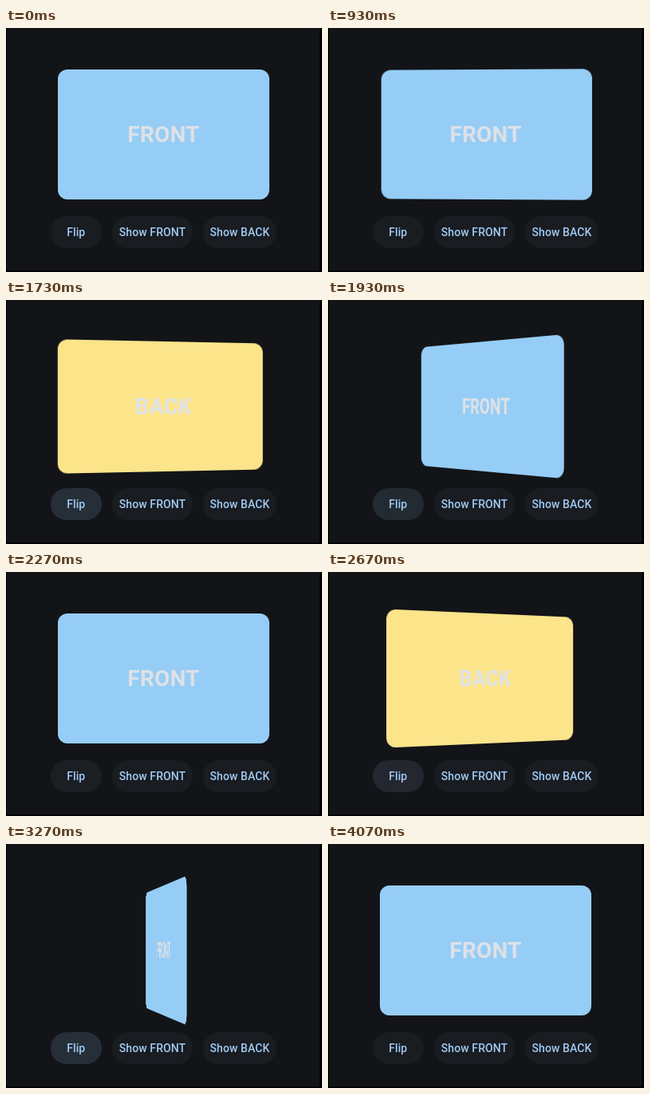
An HTML page for the animation above (4670 ms loop, 396 by 306 pixels).

```html
<!DOCTYPE html>
<html lang="en">
<head>
<meta charset="utf-8">
<title>Flip card</title>
<style>
  html, body { margin: 0; width: 100%; height: 100%; overflow: hidden; background: #000; }
  body { position: relative; font-family: Roboto, sans-serif; }
  .screen { position: absolute; left: 1px; top: 0; width: 392px; height: 304px; background: #121418; }
  .card, .button {
    position: absolute; display: flex; align-items: center; justify-content: center;
    white-space: nowrap;
  }
  .card {
    left: 65px; top: 51.5px; width: 265px; height: 163px; border-radius: 12px;
    color: #dee1e6; font-size: 28px; font-weight: 700; letter-spacing: 0.2px;
  }
  .button {
    top: 235.5px; height: 40px; border-radius: 20px; background: #191c20;
    color: #a0caf6; font-size: 14px; font-weight: 500; letter-spacing: 0.1px;
  }
  #flip { left: 55.5px; width: 64.5px; }
  #show-front { left: 133px; width: 101px; }
  #show-back { left: 247px; width: 92px; }
</style>
</head>
<body>
<div class="screen"></div>
<div class="card" id="card">FRONT</div>
<div class="button" id="flip">Flip</div>
<div class="button" id="show-front">Show FRONT</div>
<div class="button" id="show-back">Show BACK</div>
<script>
  const LOOP = 4670;
  const STEP = 200 / 3;
  const FLIP_MS = 450;
  const FLIP_STARTS = [880, 1641, 2344, 3029];

  const REST = [25, 28, 32];
  const HOVER = [36, 38, 48];
  const PRESS = [38, 47, 56];
  const TINTS = [
    [930, REST], [1050, PRESS], [1250, PRESS], [1470, REST], [1560, REST],
    [1680, PRESS], [1870, PRESS], [2130, REST], [2270, [27, 30, 35]],
    [2400, PRESS], [2500, HOVER], [2930, HOVER], [3070, PRESS],
    [3270, PRESS], [3530, REST]
  ];

  const card = document.getElementById("card");
  const flipButton = document.getElementById("flip");

  const clamp = v => Math.min(1, Math.max(0, v));
  const mix = (a, b, k) => a + (b - a) * k;

  // Cubic Bezier ease (0.42, 0, 0.58, 1), solved by bisection.
  function easeInOut(x) {
    if (x <= 0 || x >= 1) return clamp(x);
    let lo = 0, hi = 1, u = 0.5;
    for (let i = 0; i < 24; i++) {
      u = (lo + hi) / 2;
      const v = 1 - u;
      const px = 1.26 * v * v * u + 1.74 * v * u * u + u * u * u;
      if (px < x) lo = u; else hi = u;
    }
    return u * u * (3 - 2 * u);
  }

  function angleAt(t) {
    return FLIP_STARTS.reduce((angle, start, i) => {
      const turn = 180 * easeInOut((t - start) / FLIP_MS);
      return angle + (i % 2 ? -turn : turn);
    }, 0);
  }

  function tintAt(t) {
    const next = TINTS.findIndex(([time]) => time > t);
    if (next <= 0) return REST;
    const [t0, from] = TINTS[next - 1];
    const [t1, to] = TINTS[next];
    return from.map((c, i) => Math.round(mix(c, to[i], (t - t0) / (t1 - t0))));
  }

  function draw(t) {
    const angle = angleAt(t);
    const isFront = angle < 90;
    const tilt = isFront ? -angle : 180 - angle;
    card.textContent = isFront ? "FRONT" : "BACK";
    card.style.background = isFront ? "#96cdf6" : "#fbe48a";
    card.style.transform = Math.abs(tilt) < 0.05 ? "none" : `perspective(1000px) rotateY(${tilt}deg)`;
    flipButton.style.background = `rgb(${tintAt(t).join(",")})`;
  }

  const origin = performance.now();

  function tick() {
    const t = (performance.now() - origin) % LOOP;
    // The screen refreshes about 15 times a second, on 10 ms marks.
    const step = Math.floor((t + 3.4) / STEP);
    draw(Math.round(step * STEP / 10) * 10);
    requestAnimationFrame(tick);
  }

  tick();
</script>
</body>
</html>
```
